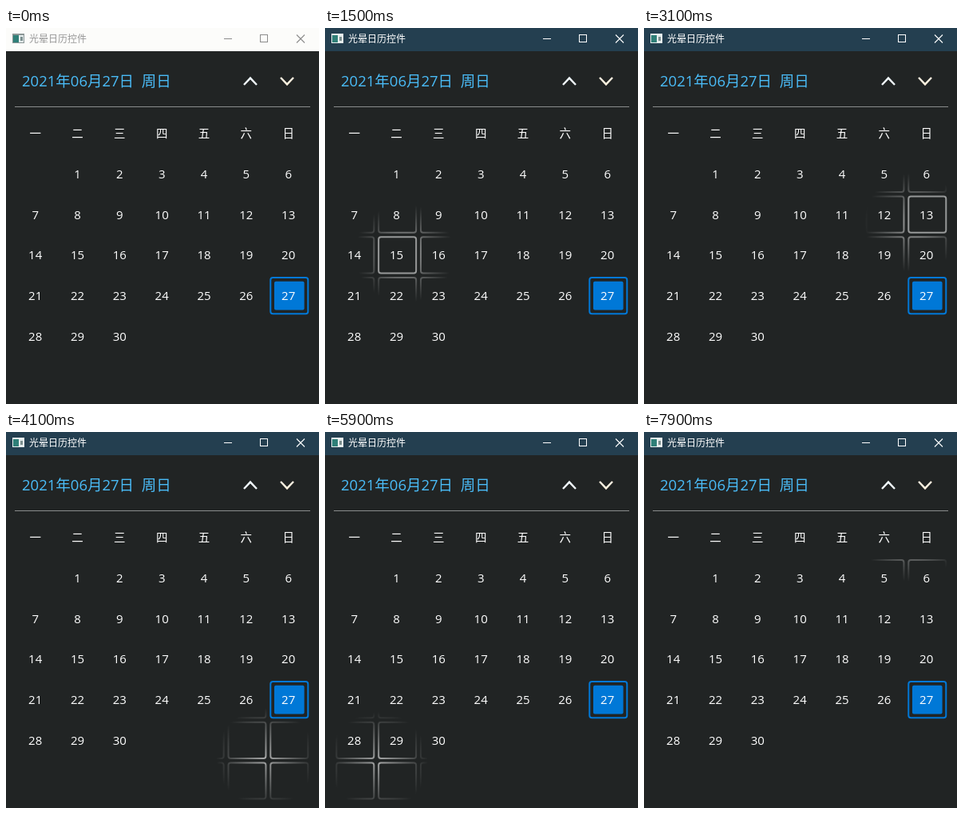
Write an HTML page with a canvas that moves like this. It is 392 px wide and 470 px high and loops after 8 s.

```html
<!DOCTYPE html>
<html lang="zh-CN">
<head>
<meta charset="utf-8">
<title>光晕日历控件</title>
<style>
html, body { margin: 0; width: 100%; height: 100%; overflow: hidden; background: #212424; }
canvas { display: block; width: 392px; height: 470px; }
</style>
</head>
<body>
<canvas id="stage" width="392" height="470"></canvas>
<script>
const ctx = document.getElementById('stage').getContext('2d');
const LOOP = 8000, STEP = 100, TITLE_ACTIVE = 1100;
const PITCH_X = 52.83, PITCH_Y = 50.7, CELL_W = 49, CELL_H = 47.2;
const HALO = 62, TODAY = 27;
const BLUE = '#0078d7';
const FONTS = '"Open Sans", "Noto Sans CJK SC", "Noto Sans CJK", sans-serif';
const HAN = '"Noto Sans CJK SC", "Noto Sans CJK", sans-serif';

// Each sweep is a parabola from where the pointer rests, through `via` at half time, to `to`.
const ENTRY = [262, 112];
const sweeps = [
  { start: 500, end: 900, via: [205, 170], to: [153, 234] },
  { start: 1200, end: 2100, via: [90, 285], to: [133, 211] },
  { start: 2100, end: 3100, via: [250, 190], to: [338, 243] },
  { start: 3100, end: 4100, via: [286, 310], to: [325, 407] },
  { start: 4100, end: 5900, via: [182, 436], to: [67, 412] },
  { start: 5900, end: 7200, via: [78, 342], to: [205, 226] },
  { start: 7500, end: 7700, via: [240, 240], to: [288, 259] },
  { start: 7800, end: 7900, via: [312, 190], to: [335, 125] }
];

const cells = Array.from({ length: 42 }, (_, i) => {
  const col = i % 7, row = Math.floor(i / 7);
  return {
    x: 13.3 + PITCH_X * col,
    y: 158.9 + PITCH_Y * row,
    cx: 36.7 + PITCH_X * col,
    baseline: 187.9 + PITCH_Y * row,
    day: i >= 1 && i <= 30 ? i : 0
  };
});

function pointerAt(t) {
  const i = sweeps.findLastIndex(s => s.start <= t);
  if (i < 0) return null;
  const { start, end, via, to } = sweeps[i];
  const from = i ? sweeps[i - 1].to : ENTRY;
  const u = Math.min(1, (t - start) / (end - start));
  const [x, y] = from.map((a, k) =>
    (2 * u - 1) * ((u - 1) * a + u * to[k]) + 4 * u * (1 - u) * via[k]);
  return { x, y };
}

function text(str, x, baseline, size, family, color, align = 'left') {
  ctx.font = `${size}px ${family}`;
  ctx.fillStyle = color;
  ctx.textAlign = align;
  ctx.fillText(str, x, baseline);
}

function line(points, color, width) {
  ctx.beginPath();
  points.forEach(([x, y]) => ctx.lineTo(x, y));
  ctx.strokeStyle = color;
  ctx.lineWidth = width;
  ctx.stroke();
}

function fillRect(x, y, w, h, color) {
  ctx.fillStyle = color;
  ctx.fillRect(x, y, w, h);
}

function cellBorder(cell, color) {
  ctx.beginPath();
  ctx.roundRect(cell.x + 1, cell.y + 1, CELL_W - 2, CELL_H - 2, 3);
  ctx.strokeStyle = color;
  ctx.lineWidth = 2;
  ctx.stroke();
}

function chevron(cx, cy, rise, color) {
  line([[cx - 8, cy + rise], [cx, cy - rise], [cx + 8, cy + rise]], color, 2.4);
}

function drawTitleBar(active) {
  const ink = active ? '#ffffff' : '#8c8c8c';
  fillRect(0, 0, 392, 29, active ? '#243f50' : '#fcfcfa');
  fillRect(8, 7, 15, 12, active ? '#e8eeee' : '#8b9696');
  fillRect(9, 9, 13, 9, '#e4ecec');
  fillRect(9, 9, 7, 9, '#2f7f78');
  fillRect(18, 11, 3, 5, '#7d9090');
  text('光晕日历控件', 29, 18, 12, HAN, active ? '#ffffff' : '#999999');
  line([[273, 13.5], [283, 13.5]], ink, 1);
  ctx.strokeRect(318.5, 8.5, 9, 9);
  line([[364, 8.5], [374, 18.5]], ink, 1.1);
  line([[374, 8.5], [364, 18.5]], ink, 1.1);
}

function drawHeader() {
  text('2021年06月27日  周日', 20, 73, 18.5, FONTS, '#4abcf8');
  chevron(306, 66.8, 4.2, '#f2faff');
  chevron(352, 66.2, -4.2, '#fff3e0');
  fillRect(11, 98, 370, 1, '#8a8c8c');
  [...'一二三四五六日'].forEach((s, i) => text(s, cells[i].cx, 137, 14.5, HAN, '#ffffff', 'center'));
}

function drawHalo(p) {
  const glow = ctx.createRadialGradient(p.x, p.y, 0, p.x, p.y, HALO);
  glow.addColorStop(0, 'rgba(255,255,255,0.6)');
  glow.addColorStop(1, 'rgba(255,255,255,0)');
  for (const cell of cells) {
    const hovered = cell.day && p.x >= cell.x && p.x < cell.x + CELL_W &&
      p.y >= cell.y && p.y < cell.y + CELL_H;
    if (cell.day !== TODAY) cellBorder(cell, hovered ? '#979999' : glow);
  }
}

function drawDays() {
  for (const cell of cells) {
    if (!cell.day) continue;
    if (cell.day === TODAY) {
      cellBorder(cell, BLUE);
      ctx.beginPath();
      ctx.roundRect(cell.x + 5.7, cell.y + 5.8, CELL_W - 11.4, CELL_H - 11.6, 2);
      ctx.fillStyle = BLUE;
      ctx.fill();
    }
    text(cell.day, cell.cx, cell.baseline, 15, FONTS, '#ffffff', 'center');
  }
}

function draw(now) {
  const t = Math.floor((now % LOOP) / STEP) * STEP;
  const pointer = pointerAt(t);
  fillRect(0, 0, 392, 470, '#212424');
  drawTitleBar(t >= TITLE_ACTIVE);
  drawHeader();
  if (pointer) drawHalo(pointer);
  drawDays();
}

const start = performance.now();
function tick() {
  draw(performance.now() - start);
  requestAnimationFrame(tick);
}
tick();
</script>
</body>
</html>
```
